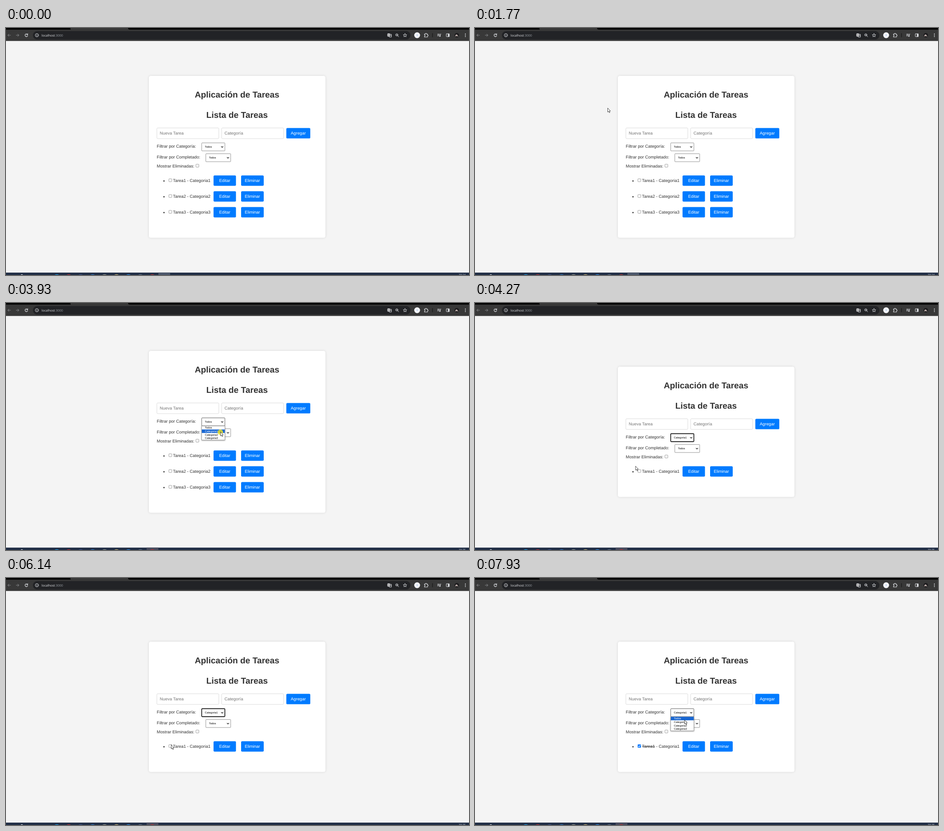
Animation, 1024 px wide and 547 px high, one loop 8000 ms. Source, as an HTML page:

```html
<!DOCTYPE html>
<html lang="es">
<head>
<meta charset="utf-8">
<title>Lista de Tareas</title>
<style>
  html, body { margin: 0; width: 100%; height: 100%; overflow: hidden; background: #f4f4f4; }
  svg { display: block; width: 100%; height: 100%; }
  text { font-family: "Liberation Sans", Arial, sans-serif; font-size: 9.4px; fill: #333; white-space: pre; text-rendering: geometricPrecision; }
  .heading { font-size: 18.85px; font-weight: bold; text-anchor: middle; }
  .hint { fill: #757575; }
  .label { fill: #fff; text-anchor: middle; }
  .option { font-size: 5.87px; fill: #000; }
  .selected { fill: #fff; }
  .done { text-decoration: line-through; }
  .ui { font-family: "Open Sans", "Noto Sans", sans-serif; font-size: 7px; fill: #e8eaed; }
  .icon { fill: none; stroke: #dadce0; stroke-width: 1; stroke-linecap: round; stroke-linejoin: round; }
  #card { filter: drop-shadow(0 0 2.7px rgba(0, 0, 0, .12)); }
  .list { filter: drop-shadow(0 1px 1.5px rgba(0, 0, 0, .35)); }
</style>
</head>
<body>
<svg viewBox="0 0 1024 547" preserveAspectRatio="none">
  <rect width="1024" height="547" fill="#f4f4f4"/>
  <g id="browser">
    <rect width="1024" height="28.7" fill="#383838"/>
    <path d="M0 0H141Q143 0 143 3.5H0ZM270 0H1024V3.5H274Q270 3.5 270 0Z" fill="#000"/>
    <rect x="59.5" y="6.8" width="835" height="18.6" rx="9.3" fill="#222326"/>
    <g class="icon">
      <path d="M10 16H4M6.7 13.2 4 16 6.7 18.8M22.5 16H28.5M25.8 13.2 28.5 16 25.8 18.8" stroke="#85878a"/>
      <path d="M47.6 14.3A3 3 0 1 0 48 17M48 12.7V14.8H45.8" stroke-width="1.2"/>
      <circle cx="68.3" cy="16" r="3.6"/>
      <path d="M68.3 15.8V17.8M68.3 14.2V14.3"/>
      <rect x="844" y="12.5" width="5" height="6" rx=".7" fill="#aaa"/>
      <path d="M849.5 14H852.5V20H847.5M850 16.5H851.5"/>
      <circle cx="864.3" cy="15.2" r="2.5"/>
      <path d="M866.3 17.2 868.6 19.5M863.2 15.2H865.4"/>
      <path d="M882.5 12.2 883.6 14.8 886.4 15 884.3 16.9 884.9 19.6 882.5 18.1 880.1 19.6 880.7 16.9 878.6 15 881.4 14.8Z"/>
      <path d="M925.5 13.3H927.6A1.4 1.4 0 0 1 930.4 13.3H932.2V15.2A1.4 1.4 0 0 1 932.2 18V20H925.5V18A1.3 1.3 0 0 0 925.5 15.3Z" stroke-width="1.2"/>
      <path d="M943.3 12V20" stroke="#111"/>
      <path d="M954.5 13.5H959M954.5 15.5H959M954.5 17.5H957M960.6 18V13.5H962"/>
      <circle cx="959.6" cy="18" r="1" fill="#dadce0"/>
      <rect x="973.8" y="12.8" width="6.8" height="6.4" rx=".6"/>
    </g>
    <rect x="977.4" y="12.8" width="3.2" height="6.4" fill="#dadce0"/>
    <circle cx="909.3" cy="16" r="6.5" fill="#f4f6fa"/>
    <rect x="908.5" y="14.5" width="1.8" height="3" fill="#a7c4ed"/>
    <circle cx="997" cy="16" r="5" fill="#1d1c1e"/>
    <path d="M993.5 18.8Q994 14.5 996 14.2T1000.5 19Q997 17.2 993.5 18.8Z" fill="#b9aaa6"/>
    <g fill="#e8eaed"><circle cx="1016" cy="13" r=".9"/><circle cx="1016" cy="16" r=".9"/><circle cx="1016" cy="19" r=".9"/></g>
    <text class="ui" x="78.7" y="18.6">localhost<tspan fill="#9aa0a6">:3000</tspan></text>
  </g>
  <rect id="card" x="316" width="390.5" rx="4.3" fill="#fff"/>
  <g id="app"></g>
  <g id="taskbar">
    <rect y="541.7" width="1024" height="5.3" fill="#202d45"/>
    <rect id="tile" y="541.7" width="26" height="5.3"/>
    <g id="icons"></g>
    <text id="clock" class="ui" x="1001" y="549.4" style="font-size:6.1px"></text>
  </g>
  <g id="pointer">
    <circle id="press" r="6" cy="1" fill="#f5e820" fill-opacity=".8"/>
    <path d="M.4.4V9.4L2.4 7.6 4 10.9 5.4 10.2 3.8 7.1H6.6Z" fill="#fff" stroke="#222" stroke-width=".8"/>
  </g>
</svg>
<script>
const LOOP = 8000;
const BLUE = '#007bff';
const $ = id => document.getElementById(id);
const between = (t, from, to) => t >= from && t < to;

// Pointer path: time, x, y
const path = [
  [70, 992, 521], [350, 760, 400], [600, 520, 305], [810, 393, 255],
  [950, 464, 125], [1060, 560, 94], [1200, 784, 200], [1350, 600, 434],
  [1500, 273, 300], [1640, 340, 150], [1700, 330, 120], [1800, 278, 200],
  [2000, 420, 330], [2250, 590, 330], [2500, 604, 278], [2640, 594, 263],
  [2800, 612, 257], [3100, 520, 262], [3340, 472, 261], [3500, 472, 262],
  [3660, 474, 285], [4060, 474, 285], [4380, 293, 400], [4620, 350, 452],
  [4800, 445, 395], [4920, 410, 338], [5100, 347.5, 383], [5300, 356, 374],
  [5450, 363, 369], [5720, 365, 369], [6650, 365, 369], [6800, 410, 345],
  [6990, 463, 317], [7260, 463, 299], [7600, 463, 299], [7800, 463, 314]
];

function pointerAt(t) {
  const next = path.findIndex(p => p[0] > t);
  if (next < 0) return path.at(-1).slice(1);
  const [t0, x0, y0] = path[Math.max(0, next - 1)], [t1, x1, y1] = path[next];
  const k = Math.max(0, (t - t0) / (t1 - t0));
  return [x0 + (x1 - x0) * k, y0 + (y1 - y0) * k];
}

const rect = (x, y, w, h, fill, extra = '') =>
  `<rect x="${x}" y="${y}" width="${w}" height="${h}" fill="${fill}" ${extra}/>`;
const text = (x, y, content, style = '') => `<text x="${x}" y="${y}" class="${style}">${content}</text>`;

const field = (x, hint) =>
  rect(x, 221.3, 137, 23.7, '#fff', 'rx="2" stroke="#ccc" stroke-width=".7"') + text(x + 6.3, 236.2, hint, 'hint');

const button = (x, y, w, label) =>
  rect(x, y, w, 23, BLUE, 'rx="2.2"') + text(x + w / 2, y + 14.6, label, 'label');

function select(x, y, w, value, mode) {
  const outline = { focus: 'rx="1.6" stroke="#101010" stroke-width="1.6"', hover: 'rx="1" stroke="#4f4f4f" stroke-width=".9"' }[mode]
    || 'rx="1" stroke="#767676" stroke-width=".8"';
  const cx = x + w - 6;
  return rect(x, y, w, 17.7, '#fff', outline) + text(x + 7, y + 10.9, value, 'option')
    + `<path d="M${cx - 2.2} ${y + 7.8}l2.2 2.2 2.2-2.2" fill="none" stroke="#111" stroke-width="1.2"/>`;
}

const checkbox = (x, y, checked) => checked
  ? rect(x, y, 7.2, 7.2, '#0075ff', 'rx="1.2"')
    + `<path d="M${x + 1.5} ${y + 3.7}l1.5 1.6 2.8-3.3" fill="none" stroke="#fff" stroke-width="1.1"/>`
  : rect(x + .4, y + .4, 6.5, 6.5, '#fff', 'rx="1.1" stroke="#767676" stroke-width=".7"');

function task(n, done) {
  const y = 326.5 + 35 * (n - 1);
  return `<circle cx="349.4" cy="${y + 12.2}" r="1.5" fill="#333"/>` + checkbox(359.8, y + 7, done)
    + text(369.3, y + 14.6, `<tspan class="${done ? 'done' : ''}">Tarea${n}</tspan> - Categoria${n}`)
    + button(459, y, 49.6, 'Editar') + button(520, y, 50, 'Eliminar');
}

function dropdown(active) {
  const options = ['Todos', 'Categoria1', 'Categoria2', 'Categoria3'];
  return rect(432.8, 272.2, 51.3, 31.4, '#fff', 'class="list" stroke="#767676" stroke-width=".7"')
    + rect(433.1, 272.4 + 7.7 * active, 50.7, 7.7, '#1967d2')
    + options.map((o, i) => text(440, 278.1 + 7.7 * i, o, i === active ? 'option selected' : 'option')).join('');
}

function app({ filtered, done, active, categoryMode, statusMode }) {
  return text(511, 153.7, 'Aplicación de Tareas', 'heading')
    + text(511, 199.4, 'Lista de Tareas', 'heading')
    + field(333.7, 'Nueva Tarea') + field(476.9, 'Categoría') + button(620, 221.6, 53, 'Agregar')
    + text(333.6, 265.2, 'Filtrar por Categoría:')
    + select(432.8, 254.4, 51.3, filtered ? 'Categoria1' : 'Todos', categoryMode)
    + text(333.6, 289.3, 'Filtrar por Completado:')
    + select(441.9, 278.4, 55, 'Todos', statusMode)
    + text(333.6, 308.8, 'Mostrar Eliminadas:') + checkbox(419.6, 301.3, false)
    + (filtered ? [1] : [1, 2, 3]).map(n => task(n, done)).join('')
    + (active >= 0 ? dropdown(active) : '');
}

function stateAt(t) {
  const filtered = t >= 4060, open = between(t, 3580, 4060) || t >= 7460;
  return {
    filtered,
    done: t >= 6320,
    active: !open ? -1 : filtered ? (t < 7700 ? 1 : 0) : (t < 3640 ? 0 : 1),
    categoryMode: between(t, 4060, 6320) ? 'focus' : between(t, 3250, 4060) || t >= 7200 ? 'hover' : '',
    statusMode: between(t, 6900, 7130) ? 'hover' : ''
  };
}

const iconColors = ['#c9ced6', '#1d8fd0', '#a52c35', '#3c4f82', '#2c6fb5', '#8a8f88', '#b5a46c', '#2b82d4', '#5b6c80', '#a92f35'];
$('icons').innerHTML = iconColors.map((c, i) =>
  `<ellipse cx="${i ? 86 + 26.4 * i : 35}" cy="547.3" rx="${i ? 4.5 : 2.5}" ry="1.9" fill="${c}"/>`).join('');

let shown = '';
function draw(now) {
  const t = now % LOOP, state = stateAt(t), key = JSON.stringify(state);
  if (key !== shown) {
    shown = key;
    const shift = state.filtered ? 35 : 0;
    $('app').innerHTML = app(state);
    $('app').setAttribute('transform', `translate(0 ${shift})`);
    $('card').setAttribute('y', 106 + shift);
    $('card').setAttribute('height', 358.5 - 2 * shift);
  }
  $('clock').textContent = t < 2000 ? '20:24' : '20:25';
  const early = t < 3000;
  $('tile').setAttribute('x', early ? 337 : 311);
  $('tile').setAttribute('fill', early ? '#4b566a' : t < 3460 ? 'none' : '#474a5c');
  $('pointer').setAttribute('transform', `translate(${pointerAt(t)})`);
  $('pointer').style.display = t < 70 ? 'none' : '';
  $('press').style.display = between(t, 3500, 3600) || between(t, 3860, 4060) ? '' : 'none';
  requestAnimationFrame(() => draw(performance.now()));
}
draw(performance.now());
</script>
</body>
</html>
```
